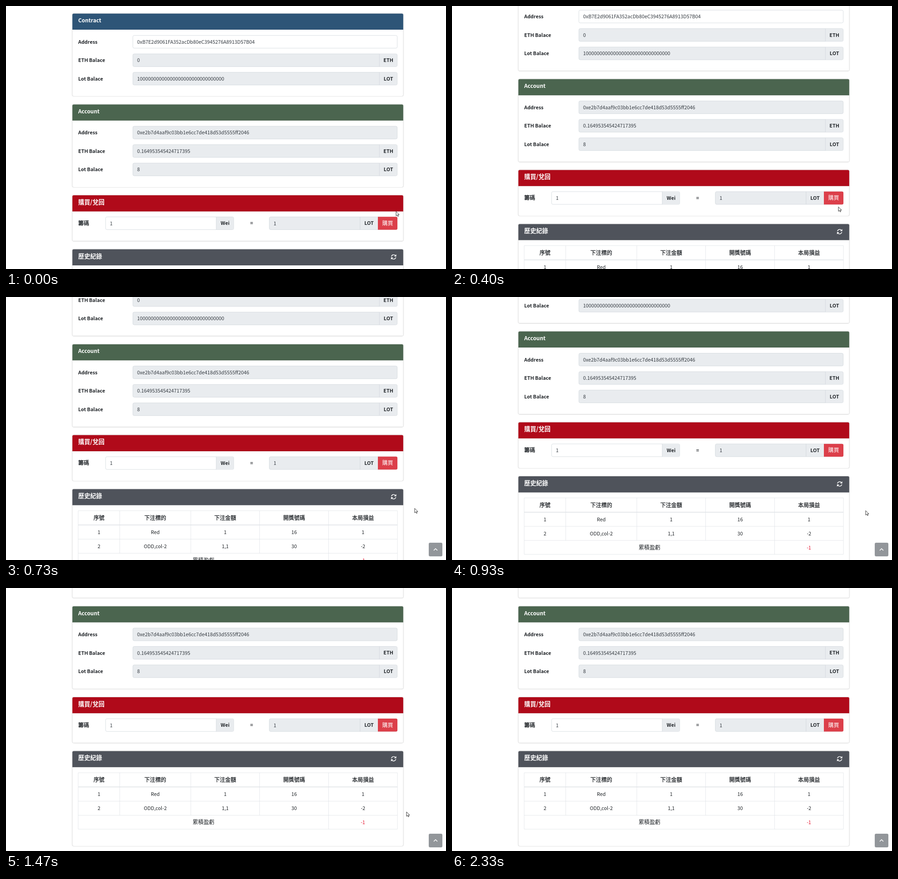
These frames come from a looping animation (969 px wide and 578 px high, 2790 ms). An HTML page:

```html
<!DOCTYPE html>
<html lang="zh-Hant">
<head>
<meta charset="utf-8">
<title>Lot</title>
<style>
html, body { margin: 0; width: 100%; height: 100%; overflow: hidden; background: #fff; }
svg { display: block; width: 969px; height: 578px; }
text { font-family: "Noto Sans CJK TC", "Noto Sans CJK", "Noto Sans TC", sans-serif; white-space: pre; }
.card { filter: drop-shadow(0 0 .5px rgba(0,0,0,.3)) drop-shadow(0 .8px 1px rgba(0,0,0,.26)); }
</style>
</head>
<body>
<svg viewBox="0 0 969 578">
  <g id="page"></g>
  <g id="up">
    <rect x="931" y="540" width="30" height="30" rx="3" fill="#92969a"/>
    <path d="M942 557l4-4 4 4" fill="none" stroke="#fff" stroke-width="1.5"/>
  </g>
  <path id="cursor" d="M0 0V9.8L2.3 7.7 3.9 11 5.5 10.3 4 7.1H7Z" fill="#fff" stroke="#222" stroke-width=".9"/>
</svg>
<script>
const $ = id => document.getElementById(id);
const INK = '#212529', LINE = '#ced4da', GRAY = '#e9ecef', GRID = '#dee2e6';
const TABLE_X = [159, 250.5, 407, 558.5, 710.5, 862];
const TABLE_Y = [582.2, 613.5, 644.7, 675.7, 706.2];

const isHan = s => /[\u4e00-\u9fff]/.test(s);

// y is the middle of the capitals; a thin stroke stands for medium weight
function text(x, y, s, { weight = 400, fill = INK, anchor = 'start', scale = 1 } = {}) {
  const size = (isHan(s) ? 12 : 10.8) * scale;
  const medium = weight == 500 ? `stroke="${fill}" stroke-width=".3"` : '';
  return `<text x="${x}" y="${y + size * .37}" font-size="${size}" font-weight="${weight}" fill="${fill}" text-anchor="${anchor}" ${medium}>${s}</text>`;
}
const centered = (x, y, s, style) => text(x, y, s, { anchor: 'middle', ...style });
const line = (x1, y1, x2, y2, width = .75, color = GRID) =>
  `<path d="M${x1} ${y1}L${x2} ${y2}" stroke="${color}" stroke-width="${width}"/>`;

function card(top, bottom, color, title) {
  return `<rect class="card" x="146.2" y="${top - .3}" width="728.6" height="${bottom - top + .3}" rx="3" fill="#fff"/>
    <path d="M146.2 ${top + 35}v-32.3q0-3 3-3h722.6q3 0 3 3v32.3z" fill="${color}"/>` +
    line(146.2, top + 34.6, 874.8, top + 34.6, .75, 'rgba(0,0,0,.125)') +
    text(159, top + 14.7, title, { weight: 700, fill: '#fff', scale: 1.1 });
}

function field(x1, x2, y, value, fill = GRAY, unit, unitX) {
  const box = `<rect x="${x1 + .4}" y="${y - 14}" width="${x2 - x1 - .8}" height="28" rx="3" fill="${fill}" stroke="${LINE}" stroke-width=".75"/>`;
  let out = box + text(x1 + 9.8, y + .3, value, { fill: '#343a40' });
  if (unit) {
    out += `<path d="M${unitX} ${y - 13.6}H${x2 - 3}q2.3 0 2.3 2.5v22.2q0 2.5-2.3 2.5H${unitX}z" fill="${GRAY}"/>` +
      line(unitX, y - 14, unitX, y + 14, .75, LINE) +
      centered((unitX + x2) / 2, y, unit, { weight: 700 });
  }
  return out;
}

function account(y, address, addressFill, eth, lot) {
  const label = (dy, s) => text(159, y + dy, s, { weight: 700 });
  return label(0, 'Address') + field(279, 862, y - .3, address, addressFill) +
    label(40.5, 'ETH Balace') + field(279, 862, y + 40.2, eth, GRAY, 'ETH', 822.3) +
    label(81, 'Lot Balace') + field(279, 862, y + 80.7, lot, GRAY, 'LOT', 822.3);
}

function exchange(y) {
  return text(159, y, '籌碼', { weight: 500 }) +
    field(219, 502, y, '1', '#fff', 'Wei', 463) +
    centered(541, y, '=', { weight: 700 }) +
    field(579.5, 862, y, '1') +
    line(779.8, y - 14, 779.8, y + 14, .75, LINE) +
    centered(799.5, y, 'LOT', { weight: 700 }) +
    `<path d="M819 ${y - 14.2}h40q3 0 3 3v22.4q0 3-3 3h-40z" fill="#dc3f4a"/>` +
    centered(840.5, y, '購買', { fill: '#fff' });
}

function refreshIcon(x, y) {
  const half = '<path d="M-4.9-.9A5 5 0 0 1 3.9-3" fill="none" stroke="#fff" stroke-width="1.4"/><path d="M5.8-5.8V-1.1H1.1z" fill="#fff"/>';
  return `<g transform="translate(${x} ${y})">${half}<g transform="rotate(180)">${half}</g></g>`;
}

function table() {
  const [left, right] = [TABLE_X[0], TABLE_X[5]];
  const [top, bottom] = [TABLE_Y[0], TABLE_Y[4]];
  const rows = [
    ['序號', '下注標的', '下注金額', '開獎號碼', '本局損益'],
    ['1', 'Red', '1', '16', '1'],
    ['2', 'ODD,col-2', '1,1', '30', '-2'],
  ];
  let out = `<rect id="hover" x="${left}" width="${right - left}" fill="#000" opacity=".075"/>`;
  rows.forEach((row, r) => row.forEach((s, c) => {
    const y = (TABLE_Y[r] + TABLE_Y[r + 1]) / 2 + (r ? .4 : 0);
    out += centered((TABLE_X[c] + TABLE_X[c + 1]) / 2, y, s, { weight: r ? 400 : 500 });
  }));
  out += centered(435, 691, '累積盈虧') + centered(786, 691.3, '-1', { fill: '#e6132f' });
  TABLE_Y.forEach((y, i) => out += line(left, y, right, y, i == 1 ? 1.5 : .75));
  TABLE_X.forEach((x, i) => out += line(x, top, x, i % 5 && i < 4 ? TABLE_Y[3] : bottom));
  return out;
}

$('page').innerHTML =
  card(17, 198, '#2e5577', 'Contract') +
  account(79, '0xB7E2d9061FA352acDb80eC3945276A8913D57B04', '#fff', '0', '1' + '0'.repeat(31)) +
  card(216.7, 398, '#4b654f', 'Account') +
  account(278.5, '0xe2b7d4aaf9c03bb1e6cc7de418d53d5555ff2046', GRAY, '0.164953545424717395', '8') +
  card(416.4, 516.5, '#b00a1a', '購買/兌回') +
  exchange(477.5) +
  card(535, 743.3, '#4f535b', '歷史紀錄') +
  refreshIcon(853.7, 551.5) +
  table();

// Times are in ticks, 15 per second
const NOTCH = 56.25, NOTCH_TICKS = 3, SCROLL_END = 176.2;
const NOTCH_STARTS = [3.2, 8, 12.5, 14];
const POINTER = [
  [0, 859, 451.5], [1, 851, 441.5], [6, 851, 441.5], [11, 900, 464.5], [14, 911, 469.5], [19, 911, 469.5],
  [22, 882, 492], [27, 322, 545], [29, 208.3, 541.7], [31, 130, 531], [35, 60, 580],
];

const clamp01 = v => Math.min(1, Math.max(0, v));
const smooth = p => p * p * (3 - 2 * p);

// Each wheel notch eases in and out; the last is cut short by the page end
function scrollAt(tick) {
  return NOTCH_STARTS.reduce((sum, start, i) => {
    const distance = Math.min(NOTCH, SCROLL_END - i * NOTCH);
    return sum + distance * smooth(clamp01((tick - start) / NOTCH_TICKS));
  }, 0);
}

// Monotone cubic through the keys
function sample(keys, tick, col) {
  const slope = i => keys[i + 1] && keys[i] ? (keys[i + 1][col] - keys[i][col]) / (keys[i + 1][0] - keys[i][0]) : 0;
  const tangent = i => {
    const a = slope(i - 1), b = slope(i);
    return a * b > 0 ? 2 * a * b / (a + b) : 0;
  };
  const last = keys.length - 1;
  if (tick >= keys[last][0]) return keys[last][col];
  const i = keys.findIndex(k => k[0] > tick) - 1;
  const span = keys[i + 1][0] - keys[i][0], p = (tick - keys[i][0]) / span, q = 1 - p;
  return keys[i][col] + (keys[i + 1][col] - keys[i][col]) * smooth(p) +
    span * p * q * (q * tangent(i) - p * tangent(i + 1));
}

function draw(now) {
  const t = now % 2790, rest = t % 200;
  const tick = Math.min(35, Math.floor(t / 200) * 3 + (rest >= 130 ? 2 : rest >= 70 ? 1 : 0));
  const scroll = scrollAt(tick);
  const x = sample(POINTER, tick, 1), y = sample(POINTER, tick, 2);
  $('page').setAttribute('transform', `translate(0 ${-scroll})`);
  $('cursor').setAttribute('transform', `translate(${x} ${y})`);
  $('up').style.display = scroll > 75 ? '' : 'none';

  const inside = x > TABLE_X[0] && x < TABLE_X[5];
  const row = inside ? [1, 2, 3].find(r => y + scroll >= TABLE_Y[r] && y + scroll < TABLE_Y[r + 1]) : 0;
  $('hover').setAttribute('y', row ? TABLE_Y[row] : 0);
  $('hover').setAttribute('height', row ? TABLE_Y[row + 1] - TABLE_Y[row] : 0);
}

const start = performance.now();
function loop() {
  draw(performance.now() - start);
  requestAnimationFrame(loop);
}
loop();
</script>
</body>
</html>
```
